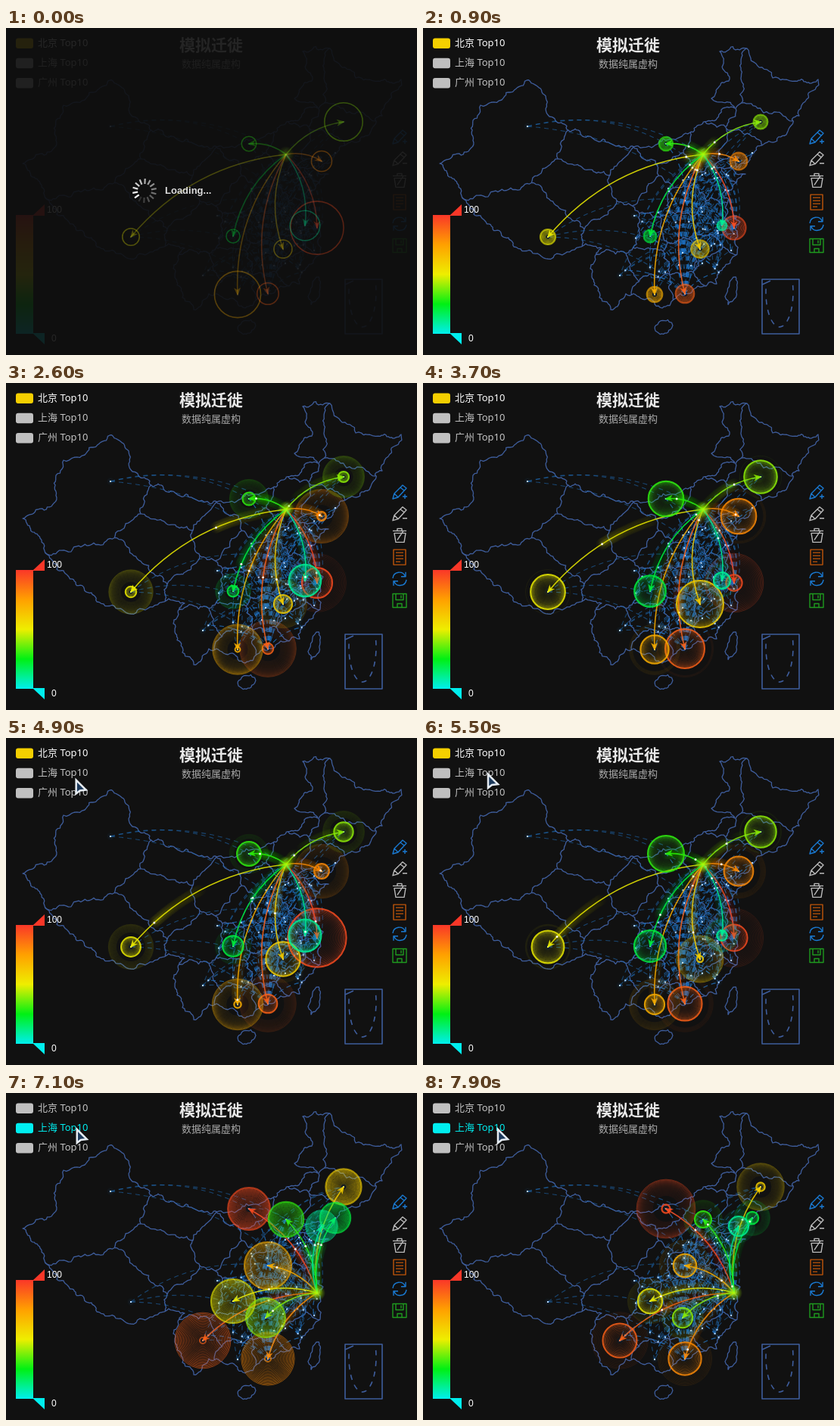
Recreate the animation shown at these times as an HTML page with a canvas. Size 543 px wide and 432 px high, loop 8 s.

```html
<!DOCTYPE html>
<html lang="zh">
<head>
<meta charset="utf-8">
<style>
  html, body { margin: 0; width: 100%; height: 100%; overflow: hidden; background: #111; }
  canvas { display: block; }
</style>
</head>
<body>
<canvas id="stage" width="543" height="432"></canvas>
<script>
const W = 543, H = 432, LOOP = 8000;
const BORDER = '#3e5d9c';
const CJK = '"Noto Sans", "Noto Sans CJK SC", "Noto Sans CJK", sans-serif';
const ARIAL = '"Liberation Sans", sans-serif';
const stage = document.getElementById('stage').getContext('2d');

let seed = 11;
const random = () => (seed = (seed * 16807) % 2147483647) / 2147483647;
const spread = size => (random() - .5) * size;
const distance = (a, b) => Math.hypot(b[0] - a[0], b[1] - a[1]);

const STOPS = [[0, 238, 238], [0, 240, 20], [238, 238, 0], [255, 160, 0], [250, 55, 40]];
function valueColor(v) {
  const i = Math.min(3, Math.floor(v / 25)), k = v / 25 - i;
  return `rgb(${STOPS[i].map((c, n) => Math.round(c + (STOPS[i + 1][n] - c) * k))})`;
}

const CITY = {
  beijing: [370, 167], shanghai: [411, 264], guangzhou: [346, 351], dalian: [417, 176],
  nanning: [306, 352], nanchang: [366, 292], lhasa: [165, 276], changchun: [446, 124],
  baotou: [321, 153], chongqing: [300, 275], changzhou: [395, 261], kunming: [260, 327],
  zhengzhou: [346, 228], changsha: [343, 297], dandong: [435, 165], urumqi: [138, 130]
};

// Targets run from the highest value to the lowest, each with its pulse duration in ms.
const GROUPS = [
  { from: CITY.beijing, start: 400, targets: {
    shanghai: 1505, guangzhou: 2000, dalian: 2050, nanning: 2200, nanchang: 1680,
    lhasa: 1900, changchun: 1880, baotou: 1750, chongqing: 1780, changzhou: 2280 } },
  { from: CITY.shanghai, start: 5610, targets: {
    baotou: 2180, kunming: 1480, guangzhou: 1470, zhengzhou: 1650, changchun: 2100,
    chongqing: 1540, changsha: 1620, beijing: 1680, dandong: 1800, dalian: 1480 } }
];

/* ---------- static map ---------- */

const COAST = [
  [137, 69], [163, 95], [167, 117], [190, 134], [245, 151], [302, 158], [347, 139], [412, 106],
  [381, 93], [404, 70], [392, 31], [428, 27], [462, 66], [522, 68], [497, 116], [437, 165],
  [413, 186], [417, 171], [380, 184], [426, 193], [395, 219], [419, 256], [412, 301], [388, 338],
  [316, 370], [278, 351], [248, 372], [233, 356], [224, 322], [236, 291], [215, 285], [165, 305],
  [120, 289], [67, 246], [45, 205], [22, 179], [60, 163], [66, 122], [76, 102], [104, 95]
];
// Province centres besides the cities above; borders run halfway between neighbours.
const CENTRES = [
  [217, 217], [235, 158], [262, 268], [296, 310], [310, 222], [338, 190], [385, 202],
  [455, 90], [388, 85], [387, 318], [378, 255], [338, 264], [285, 200]
];

// Points after a up to b, displaced at random by repeated halving.
function roughen(a, b) {
  const length = distance(a, b);
  if (length < 4) return [b];
  const shift = spread(Math.min(.5 * length, 9)) / length;
  const mid = [(a[0] + b[0]) / 2 - (b[1] - a[1]) * shift, (a[1] + b[1]) / 2 + (b[0] - a[0]) * shift];
  return [...roughen(a, mid), ...roughen(mid, b)];
}

function roughPath(points, closed) {
  const path = new Path2D();
  path.moveTo(...points[0]);
  const ends = closed ? [...points.slice(1), points[0]] : points.slice(1);
  ends.forEach((b, i) => roughen(points[i], b).forEach(p => path.lineTo(...p)));
  return path;
}

// The part of the bisector of a and b that is closer to them than to any other site.
function sharedBorder(a, b, sites) {
  const mid = [(a[0] + b[0]) / 2, (a[1] + b[1]) / 2], dir = [a[1] - b[1], b[0] - a[0]];
  let low = -5, high = 5;
  for (const c of sites) {
    if (c === a || c === b) continue;
    const slope = 2 * (dir[0] * (c[0] - a[0]) + dir[1] * (c[1] - a[1]));
    const k = (distance(mid, c) ** 2 - distance(mid, a) ** 2) / slope;
    if (slope > 0) high = Math.min(high, k);
    else low = Math.max(low, k);
  }
  return low < high && [low, high].map(k => [mid[0] + dir[0] * k, mid[1] + dir[1] * k]);
}

function island(x, y, rx, ry, tilt) {
  const points = [];
  for (let a = 0; a < 6; a += .8) {
    const u = rx * Math.cos(a), v = ry * Math.sin(a);
    points.push([x + u * Math.cos(tilt) - v * Math.sin(tilt), y + u * Math.sin(tilt) + v * Math.cos(tilt)]);
  }
  return roughPath(points, true);
}

function drawMap(g) {
  const country = roughPath(COAST, true);
  const merged = [CITY.dandong, CITY.changzhou];
  const sites = [...Object.values(CITY).filter(c => !merged.includes(c)), ...CENTRES];
  g.strokeStyle = BORDER;
  g.lineWidth = 1.3;
  g.lineJoin = 'round';
  g.stroke(country);
  g.stroke(island(408, 347, 6, 19, .25));
  g.stroke(island(318, 395, 12, 9, -.5));
  g.save();
  g.clip(country);
  sites.forEach((a, i) => sites.slice(i + 1).forEach(b => {
    const border = sharedBorder(a, b, sites);
    if (border) g.stroke(roughPath(border, false));
  }));
  g.restore();
}

// Arcs always bulge towards the top.
function control([ax, ay], [bx, by]) {
  const s = bx < ax ? .2 : -.2;
  return [(ax + bx) / 2 - s * (by - ay), (ay + by) / 2 + s * (bx - ax)];
}

function arc(g, a, b) {
  g.beginPath();
  g.moveTo(...a);
  g.quadraticCurveTo(...control(a, b), ...b);
  g.stroke();
}

function pointOnArc(a, b, k) {
  const c = control(a, b), m = 1 - k;
  return [0, 1].map(i => m * m * a[i] + 2 * m * k * c[i] + k * k * b[i]);
}

function text(g, string, x, y, font, color, align = 'left') {
  g.font = font;
  g.fillStyle = color;
  g.textAlign = align;
  g.textBaseline = 'middle';
  g.fillText(string, x, y);
}

function drawRoutes(g) {
  const dots = Object.values(CITY);
  for (let i = 0; i < 26; i++) dots.push([368 + spread(90), 255 + spread(150)]);
  for (let i = 0; i < 22; i++) dots.push([325 + spread(130), 260 + spread(140)]);
  const east = dots.filter(d => d[0] > 200);
  const pick = list => list[Math.floor(random() * list.length)];
  const hubs = [CITY.beijing, CITY.shanghai, CITY.guangzhou, CITY.zhengzhou, CITY.changsha];

  g.lineWidth = 1.1;
  g.setLineDash([6, 5]);
  g.strokeStyle = 'rgba(32,112,190,.55)';
  for (const dot of east) {
    for (let i = 0; i < 3; i++) arc(g, pick(hubs), dot);
    if (dot[0] > 320) arc(g, pick(east), dot);
  }
  for (const end of [CITY.beijing, CITY.baotou, CITY.shanghai]) arc(g, CITY.urumqi, end);
  for (const end of [CITY.zhengzhou, CITY.guangzhou, CITY.changsha]) arc(g, CITY.lhasa, end);
  g.setLineDash([]);

  g.fillStyle = '#b9dcff';
  g.shadowColor = '#3b9cff';
  g.shadowBlur = 4;
  for (const [x, y] of dots) g.fillRect(x - 1, y - 1, 2, 2);
  g.shadowBlur = 0;
}

function drawInset(g) {
  g.strokeStyle = BORDER;
  g.lineWidth = 1.6;
  g.strokeRect(448, 332, 49, 72);
  g.setLineDash([7, 7]);
  g.beginPath();
  g.ellipse(471, 349, 18, 46, 0, -.2, Math.PI + .1);
  g.stroke();
  g.setLineDash([]);
  g.stroke(new Path2D('M448 339l11-5'));
}

function drawToolbox(g) {
  const pen = 'M-9 9l2-7L4-9l5 4-11 12zM-7 2l5 5M1-6l5 4';
  const icons = [
    ['#1a7ad2', pen + 'M4 6h6M7 3v6'],
    ['#bbb', pen + 'M4 6h6'],
    ['#bbb', 'M-9-6H9M-3-6v-3h6v3M-7-3l2 12H6l2-12zM-3 6L5-6'],
    ['#c0560a', 'M-8-10H8V10H-8zM-5-6H5M-5-2H5M-5 2H5M-5 6H1'],
    ['#1a7ad2', 'M-9-1C-8-10 4-11 7-4M8-9v6H2M9 1C8 10-4 11-7 4M-8 9V3h6'],
    ['#1f9a1f', 'M-9-9H9V9H-9zM-5-9v8H5v-8M2-7v4M-3 9V4h6v5']
  ];
  g.lineWidth = 1.4;
  icons.forEach(([color, path], i) => {
    g.save();
    g.translate(520, 144 + 28.7 * i);
    g.strokeStyle = color;
    g.stroke(new Path2D(path));
    g.restore();
  });
}

function drawRange(g) {
  const gradient = g.createLinearGradient(0, 404, 0, 247);
  STOPS.forEach((c, i) => gradient.addColorStop(i / 4, `rgb(${c})`));
  g.fillStyle = gradient;
  g.fillRect(13, 247, 23, 157);
  g.fillStyle = valueColor(100);
  g.fill(new Path2D('M35 248l16-15v15z'));
  g.fillStyle = valueColor(0);
  g.fill(new Path2D('M35 403h16v15z'));
  text(g, '100', 54, 241, '12px ' + ARIAL, '#fff');
  text(g, '0', 60, 411, '12px ' + ARIAL, '#fff');
}

function buildBackdrop() {
  const canvas = document.createElement('canvas');
  canvas.width = W;
  canvas.height = H;
  const g = canvas.getContext('2d');
  g.fillStyle = '#111';
  g.fillRect(0, 0, W, H);
  drawMap(g);
  drawInset(g);
  drawRoutes(g);
  drawToolbox(g);
  drawRange(g);
  text(g, '模拟迁徙', 271, 24, 'bold 21px ' + CJK, '#e8e8e8', 'center');
  text(g, '数据纯属虚构', 271, 48, '13px ' + CJK, '#aaa', 'center');
  return canvas;
}
const backdrop = buildBackdrop();

/* ---------- moving parts ---------- */

function drawLegend(g, selected) {
  const items = [['北京', '#f4cf00', '#fff'], ['上海', '#00eef0', '#00eef0'], ['广州']];
  items.forEach(([name, color, textColor], i) => {
    const on = i === selected, y = 20 + 26.3 * i;
    g.fillStyle = on ? color : '#c0c0c0';
    g.beginPath();
    g.roundRect(13, y - 6.5, 23, 13.5, 3);
    g.fill();
    text(g, name + ' Top10', 42, y, (on ? '500 ' : '') + '13px ' + CJK, on ? textColor : '#c4c4c4');
  });
}

function circle(g, [x, y], r, alpha) {
  g.globalAlpha = alpha;
  g.beginPath();
  g.arc(x, y, r, 0, 7);
}

function ring(g, center, r, alpha) {
  circle(g, center, r, alpha);
  g.stroke();
}

function disc(g, center, r, alpha) {
  circle(g, center, r, alpha);
  g.fill();
}

// A growing ring with an afterglow that fades slowly during the first pass.
function drawPulse(g, center, size, duration, elapsed) {
  if (elapsed < 0) return;
  const first = elapsed < 1700, decay = first ? 1300 : 330;
  const radius = e => size * (.1 + .9 * (e / duration % 1));
  g.lineWidth = 1;
  for (let age = 60; age < Math.min(elapsed, 1500); age += 60) {
    ring(g, center, radius(elapsed - age), .5 * Math.exp(-age / decay) + .05);
  }
  g.lineWidth = 2;
  ring(g, center, radius(elapsed), first ? .65 : .85);
}

function drawArrow(g, from, to) {
  const c = control(from, to);
  g.save();
  g.translate(...to);
  g.rotate(Math.atan2(to[1] - c[1], to[0] - c[0]));
  g.fill(new Path2D('M2 0L-9-4.5-6 0-9 4.5z'));
  g.restore();
}

function drawSpark(g, from, to, elapsed) {
  if (elapsed < 0) return;
  const duration = 23.7 * distance(from, to);
  const place = e => pointOnArc(from, to, e / duration % 1);
  for (let age = 0; age < Math.min(elapsed, 1800); age += 60) {
    const p = place(elapsed - age);
    disc(g, p, 8, .015 + .02 * Math.exp(-age / 700));
    disc(g, p, 4, .07 * Math.exp(-age / 500));
  }
  g.fillStyle = '#fff';
  disc(g, place(elapsed), 1.5, .9);
}

function drawGroup(g, { from, start, targets }, t) {
  const fade = Math.min(1, .3 + t / 430);
  Object.entries(targets).forEach(([name, duration], i) => {
    const to = CITY[name], value = i ? 100 - 10 * i : 95, size = 20 + value / 5;
    g.strokeStyle = g.fillStyle = valueColor(value);
    g.globalAlpha = .85 * fade;
    g.lineWidth = 1.6;
    arc(g, from, to);
    drawArrow(g, from, to);
    if (t < 300) ring(g, to, size * (.55 + .35 * Math.cos(i * Math.PI * 2 / 3)), fade);
    drawPulse(g, to, size, duration, t - start);
    drawSpark(g, from, to, t - start);
  });
  const glow = g.createRadialGradient(...from, 1, ...from, 11);
  glow.addColorStop(0, 'rgba(190,255,0,.8)');
  glow.addColorStop(.5, 'rgba(150,230,0,.4)');
  glow.addColorStop(1, 'rgba(150,230,0,0)');
  g.fillStyle = glow;
  disc(g, from, 11, fade);
  g.globalAlpha = 1;
}

function drawLoading(g) {
  g.lineWidth = 2.2;
  g.strokeStyle = '#fff';
  for (let i = 0; i < 14; i++) {
    const a = Math.PI * .8 + i * Math.PI / 7, x = Math.cos(a), y = Math.sin(a);
    g.globalAlpha = 1 - i / 15;
    g.beginPath();
    g.moveTo(183 + 9 * x, 215 + 9 * y);
    g.lineTo(183 + 16 * x, 215 + 16 * y);
    g.stroke();
  }
  g.globalAlpha = 1;
  text(g, 'Loading...', 210, 215, 'bold 13px ' + ARIAL, '#ddd');
}

const CURSOR_KEYS = [[4100, 210, 170], [4800, 93, 56], [5400, 85, 47], [6500, 85, 47], [7500, 98, 47], [LOOP, 98, 47]];
function drawCursor(g, t) {
  const i = CURSOR_KEYS.findIndex(key => key[0] > t);
  if (i < 1) return;
  const [t0, x0, y0] = CURSOR_KEYS[i - 1], [t1, x1, y1] = CURSOR_KEYS[i], k = (t - t0) / (t1 - t0);
  g.save();
  g.translate(x0 + (x1 - x0) * k, y0 + (y1 - y0) * k);
  const arrow = new Path2D('M1 1V19L6 15 14 14z');
  g.fillStyle = '#1d3a5c';
  g.strokeStyle = '#e6ecf2';
  g.lineWidth = 2.5;
  g.fill(arrow);
  g.stroke(arrow);
  g.restore();
}

// The picture moves in 100 ms steps and rests briefly after loading and after the switch.
function stepTime(ms) {
  const t = Math.floor(ms / 100) * 100;
  if (t >= 300 && t < 500) return 300;
  return t === 5700 ? 5600 : t;
}

function draw(t) {
  const g = stage, selected = t < 5600 ? 0 : 1;
  g.globalAlpha = 1;
  g.drawImage(backdrop, 0, 0);
  drawLegend(g, selected);
  if (t < 300) {
    g.fillStyle = `rgba(15,15,15,${.9 - t / 300})`;
    g.fillRect(0, 0, W, H);
  }
  drawGroup(g, GROUPS[selected], t);
  if (t < 100) drawLoading(g);
  drawCursor(g, t);
}

const begin = performance.now();
function tick() {
  draw(stepTime((performance.now() - begin) % LOOP));
  requestAnimationFrame(tick);
}
tick();
</script>
</body>
</html>
```
